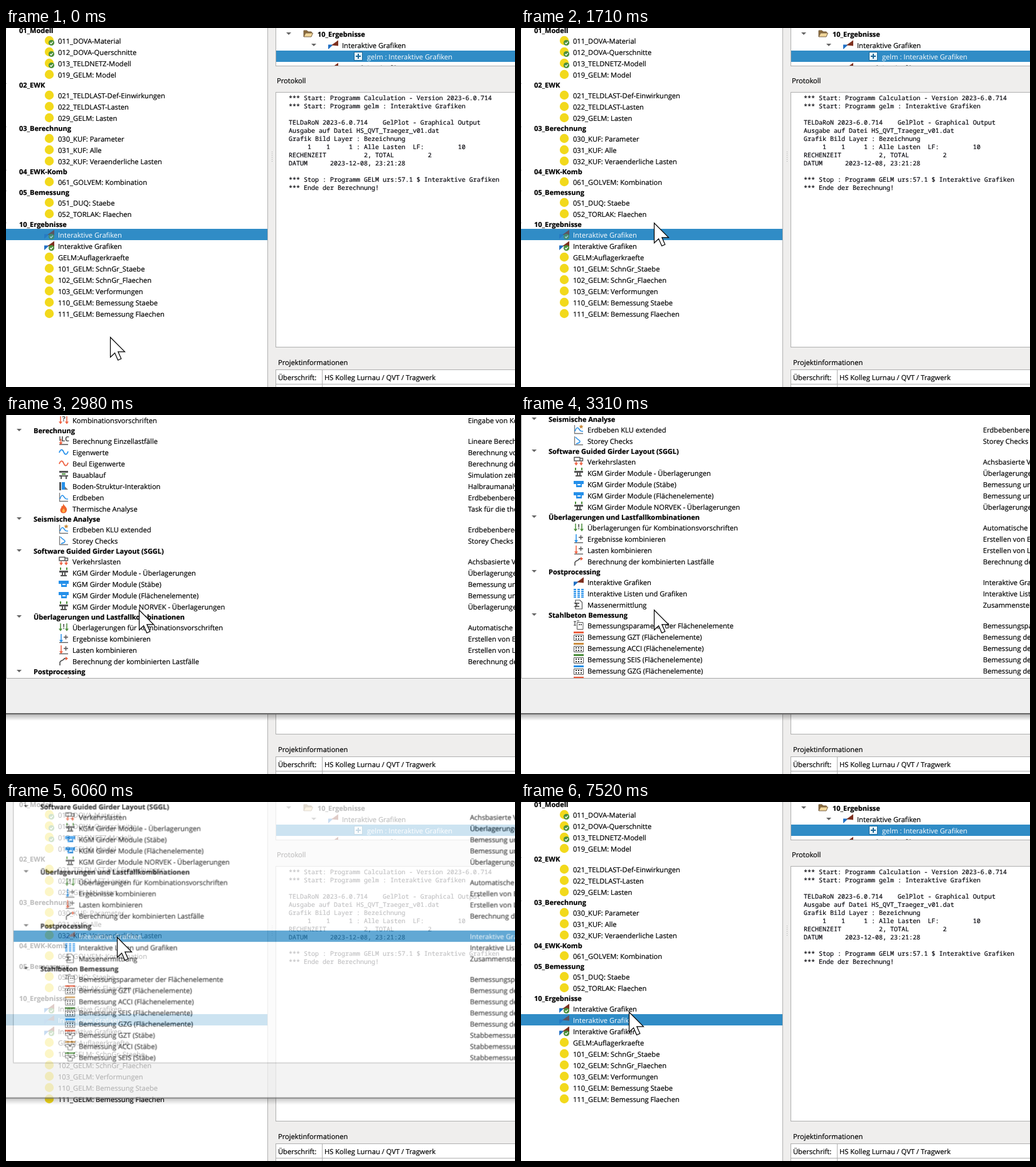
These frames come from a looping animation (812x572 px, 8 s). An HTML page:

```html
<!DOCTYPE html>
<html lang="de">
<head>
<meta charset="utf-8">
<title>Aufgabe einfügen</title>
<style>
  html, body { margin: 0; width: 100%; height: 100%; overflow: hidden; background: #fff; }
  svg { display: block; width: 812px; height: 572px; }
  text { font: 11.15px "Open Sans", "Noto Sans", sans-serif; fill: #000; stroke: #000; stroke-width: .2px; white-space: pre; text-rendering: geometricPrecision; }
  .head { font-weight: 700; font-size: 11px; }
  .log { font: 10px "Noto Sans Mono", "DejaVu Sans Mono", monospace; fill: #0a0a14; }
  .sel { fill: #fff; stroke: none; }
  #dialog { transform-origin: 1018px 73px; }
</style>
</head>
<body>
<svg viewBox="0 0 812 572">
  <defs>
    <clipPath id="listClip"><path d="M0-60H840V419H0Z"/></clipPath>
    <clipPath id="treeClip"><path d="M431 0H812V60H431Z"/></clipPath>
    <linearGradient id="shade" x2="0" y2="1">
      <stop stop-color="#000" stop-opacity=".28"/><stop offset="1" stop-color="#000" stop-opacity="0"/>
    </linearGradient>
  </defs>
  <g id="main"></g>
  <g id="before"></g>
  <g id="after"></g>
  <g id="rest"></g>
  <g id="dialog">
    <path d="M-40-60H840V477H-40Z" fill="#efefef"/>
    <path d="M0-60H840V419H0Z" fill="#fff"/>
    <g clip-path="url(#listClip)"><g id="list"></g></g>
    <path d="M.5-60V419.5H840" fill="none" stroke="#a8a8a8"/>
    <path d="M-40 476H840" stroke="#666" stroke-width="2"/>
    <path d="M-40 477H840V487H-40Z" fill="url(#shade)"/>
  </g>
  <g id="menu">
    <path d="M170 8H459V495H170Z" fill="#000" opacity=".12"/>
    <path d="M166.5 4.5H454.5V490.5H166.5Z" fill="#f2f2f2" stroke="#a0a0a0"/>
    <path id="hover" d="M168 0H453V22H168Z" fill="#90c8f6"/>
    <g id="entries"></g>
  </g>
  <circle id="ring" r="22.5" fill="none" stroke="#8a9aa8" stroke-width="2"/>
  <path id="cursor" d="M.5 .8V32.5L7.6 25.8 12.6 37.2 17.8 35 12.8 23.8H23.5Z" fill="#fff" stroke="#000" stroke-width="1.2"/>
</svg>
<script>
const LOOP = 8000;
const HILITE = '#308cc6', BLUE = '#2590ea', RED = '#ee6040', GRAY = '#555', GREEN = '#4b8f3b', AMBER = '#c98b3c', EDGE = '#b0b0b0';
const $ = id => document.getElementById(id);

const fill = (d, c) => `<path d="${d}" fill="${c}"/>`;
const line = (d, c, w = 1.5) => `<path d="${d}" fill="none" stroke="${c}" stroke-width="${w}"/>`;
const box = (x, y, w, h, c) => `<rect x="${x}" y="${y}" width="${w}" height="${h}" fill="${c}"/>`;
const txt = (x, y, s, cls = '') => `<text x="${x}" y="${y}" class="${cls}">${s}</text>`;
const at = (x, y, s, op = 1) => `<g transform="translate(${x} ${y})" opacity="${op}">${s}</g>`;
const chevron = (x, y) => fill(`M${x - 4} ${y - 2}h8l-4 4z`, '#666');

// 16 x 16 icons
const down = (x, c, y = 2) => line(`M${x} ${y}V12`, c) + fill(`M${x - 3} 10.5h6l-3 4z`, c);
const glyph = (x, y, s) => `<text x="${x}" y="${y}" style="font-weight:700;fill:${GRAY};stroke:none">${s}</text>`;
const axes = line('M1.5 1V14.5H15', '#777', 1.3);
const girder = fill('M1 5H15V8H11V12H13V14H3V12H5V8H1Z', GRAY) + fill('M7 8H9V12H7Z', '#fff');
const deck = fill('M0 3H16V8H13V13H4V8H0Z', BLUE) + fill('M6 8H11V10H6Z', '#fff');
const plate = c => box(0, 0, 16, 3, c) + line('M.5 5.5H15.5V14.5H.5Z', GRAY, 1) +
  [3, 7, 11].map(x => box(x, 7, 2, 2, '#333') + box(x, 11, 2, 2, '#333')).join('');
const beam = c => box(0, 0, 16, 3, c) + line('M.5 5.5H15.5V9.5H11.5V14.5H4.5V9.5H.5Z', GRAY, 1) + box(6, 7, 4, 2, '#333');
const wave = c => line('M1 9C3 3 6 3 8 8S13 13 15 7', c, 1.8);
const badge = `<circle cx="11.5" cy="11.5" r="4.6" fill="${GREEN}"/>` + line('M9.3 11.5L11 13.2 13.8 9.8', '#fff', 1.3);
const graph = fill('M0 7.5H8L0 15Z', '#1f6fc4') + fill('M5 8.500L16 .5V9.500Z', '#7d2f1e');
const icons = {
  dot: '<circle cx="8" cy="8" r="7.2" fill="#f2d91c"/>',
  cube: line('M2 4L8 1 14 4V8L8 14 2 8ZM2 4L8 7 14 4M8 7V14', GRAY, 1.2),
  blue: box(2, 2, 12, 12, '#2b9be8'), navy: box(2, 2, 12, 12, '#1c63b8'), black: box(1, 1, 14, 14, '#111'),
  ask: down(3, RED) + down(13, RED) + glyph(5.5, 10, '?'),
  lc: line('M2 1V8', GRAY) + line('M1 14H15', GRAY) + down(3.5, RED, 5) + glyph(4, 9, 'LC'),
  sine: wave(BLUE), buckle: wave(RED),
  stage: fill('M1 2H15V5H1ZM1 9H15V11H1ZM3 11H5V15H3ZM11 11H13V15H11Z', GRAY) + line('M5 7H11', GREEN, 2),
  soil: box(1, 2, 3, 13, GRAY) + fill('M5 2H10V14H5Z', BLUE) + fill('M10 9L15 14H10Z', '#777'),
  quake: axes + line('M2 11C5 2 7 5 9 8S12 11 15 11', BLUE),
  star: axes + line('M2 11C5 3 7 5 9 8S12 11 15 11', BLUE) + fill('M12 0L13 2.2 15.5 2.5 13.7 4.2 14.2 6.5 12 5.3 9.8 6.5 10.3 4.2 8.5 2.5 11 2.2Z', AMBER),
  flame: fill('M7 0C9 4 14 6 13 11C12 17 3 17 2.5 11C2.5 8 5 7 4.5 4C6.5 5 7.5 3 7 0Z', '#f0642c') + fill('M8 8C10 10 11 14 8 14S5 11 8 8Z', '#ffb648'),
  storey: axes + line('M3 2C5 6 13 8 9 11L4 13', BLUE),
  truck: line('M1 1.5H10V7H1ZM10 3H14.5V7H10', GRAY, 1.4) + down(4, RED, 8) + down(12, RED, 8),
  girder: girder + line('M3 0V4M13 0V4', GREEN, 2), deck,
  over: down(3, GREEN) + down(13, GREEN) + glyph(6.5, 11, '!'),
  sum: line('M1 14.5H15', GRAY, 1.3) + down(4, BLUE, 1) + line('M8 6H15M11.5 2.5V9.5', GRAY),
  load: line('M1 14.5H15', GRAY, 1.3) + down(4, RED, 1) + line('M8 6H15M11.5 2.5V9.5', GRAY),
  curve: line('M2 15V10C3 6 8 8 9 4H14', '#444') + fill('M11 1L15 4 11 7Z', RED),
  graph, done: graph + badge, checked: '<circle cx="8" cy="8" r="7.2" fill="#f2d91c"/>' + badge,
  table: [0, 6, 12].map(x => [2, 5, 8, 11, 14].map(y => box(x, y - 1, 4, 2, BLUE)).join('')).join(''),
  sigma: line('M3 5V1H10L13.5 4.5V15H3V12', GRAY, 1.2) + line('M9 6H2L5.5 8.5 2 11H9', '#333', 1.3),
  param: line('M5.5 3.5H15V14.5H5.5Z', GRAY, 1) + line('M2 2V8M0 2H4M0 8H4M5 1H9', '#333', 1) + box(8, 6, 2, 2, GRAY) + box(11, 6, 2, 2, GRAY),
  pr: plate(RED), pa: plate(AMBER), pg: plate(GREEN), pb: plate(BLUE),
  br: beam(RED), ba: beam(AMBER), bg: beam(GREEN)
};

// Rows are "icon|label|description"; a leading # marks a 15 px heading
function rows(lines, top, xHead, xIcon, xText, xOpen, sel) {
  let out = '';
  for (const row of lines.trim().split('\n')) {
    if (row[0] === '#') {
      out += chevron(xOpen, top + 7) + txt(xHead, top + 12, row.slice(1), 'head');
      top += 15;
    } else {
      const [icon, label, info] = row.split('|'), cls = sel ? 'sel' : '';
      if (sel) out += box(sel[0], top, sel[1], 18, HILITE);
      out += at(xIcon, top + 1, icons[icon], sel ? .6 : 1) + txt(xText, top + 14, label, cls);
      if (info) out += txt(737, top + 14, info, cls);
      top += 18;
    }
  }
  return out;
}
const tree = (lines, top, sel) => rows(lines, top, 21, 61, 83, -3, sel);
const tasks = (lines, top, sel) => rows(lines, top, 44, 84, 106, 21, sel);

const log = `*** Start: Programm Calculation - Version 2023-6.0.714
*** Start: Programm gelm : Interaktive Grafiken

TELDaRoN 2023-6.0.714    GelPlot - Graphical Output
Ausgabe auf Datei HS_QVT_Traeger_v01.dat
Grafik Bild Layer : Bezeichnung
     1    1     1 : Alle Lasten  LF:         10
RECHENZEIT          2, TOTAL         2
DATUM      2023-12-08, 23:21:28

*** Stop : Programm GELM urs:57.1 $ Interaktive Grafiken
*** Ende der Berechnung!`;

$('main').innerHTML =
  box(0, 0, 812, 572, '#fff') + box(417, 0, 395, 572, '#efeeed') + box(417, 0, 1, 572, EDGE) +
  [197, 200, 203, 206, 209, 212].map(y => box(424, y, 1, 1, '#aaa')).join('') +
  box(430, 0, 382, 61, EDGE) + box(431, 0, 381, 60, '#fff') + box(431, 36, 381, 18, HILITE) +
  '<g clip-path="url(#treeClip)">' + chevron(451, 9) + chevron(491, 27) +
  at(474, 1, fill('M1 3H6L8 5H14V7H4L2 13H1Z', '#8a6a3a') + fill('M4 7H16L13 13H1Z', '#f2d79a') + line('M1 13V3H6L8 5H13V7M4 7H15.5L13 13H1Z', '#7a6244', 1)) +
  txt(497, 14, '10_Ergebnisse', 'head') + at(514, 19, graph) + txt(536, 32, 'Interaktive Grafiken') +
  at(555, 38, box(0, 0, 14, 14, '#1d6796') + box(1, 1, 12, 12, '#e8f4fb') + line('M3 7H11M7 3V11', '#1d6796', 2)) +
  txt(576, 50, 'gelm : Interaktive Grafiken', 'sel') + at(514, 55, graph) + txt(536, 68, 'Interaktive Grafiken') + '</g>' +
  txt(432, 88, 'Protokoll') + box(430, 102, 382, 407, EDGE) + box(431, 103, 381, 405, '#fff') +
  log.split('\n').map((s, i) => txt(451, 115 + 13 * i, s, 'log')).join('') +
  txt(434, 537, 'Projektinformationen') + box(430, 544, 382, 28, EDGE) +
  box(431, 545, 73, 22, '#fff') + box(505, 545, 307, 22, '#fff') + box(431, 568, 73, 4, '#fff') + box(505, 568, 307, 4, '#fff') +
  txt(434, 561, 'Überschrift:') + txt(508, 561, 'HS Kolleg Lurnau / QVT / Tragwerk') +
  tree(`#01_Modell
checked|011_DOVA-Material
checked|012_DOVA-Querschnitte
checked|013_TELDNETZ-Modell
dot|019_GELM: Model
#02_EWK
dot|021_TELDLAST-Def-Einwirkungen
dot|022_TELDLAST-Lasten
dot|029_GELM: Lasten
#03_Berechnung
dot|030_KUF: Parameter
dot|031_KUF: Alle
dot|032_KUF: Veraenderliche Lasten
#04_EWK-Komb
dot|061_GOLVEM: Kombination
#05_Bemessung
dot|051_DUQ: Staebe
dot|052_TORLAK: Flaechen
#10_Ergebnisse`, -4);

$('before').innerHTML = tree('done|Interaktive Grafiken', 320, [0, 417]);
$('after').innerHTML = tree('done|Interaktive Grafiken', 320) + tree('graph|Interaktive Grafiken', 338, [0, 417]);
$('rest').innerHTML = tree(`done|Interaktive Grafiken
dot|GELM:Auflagerkraefte
dot|101_GELM: SchnGr_Staebe
dot|102_GELM: SchnGr_Flaechen
dot|103_GELM: Verformungen
dot|110_GELM: Bemessung Staebe
dot|111_GELM: Bemessung Flaechen`, 338);

$('list').innerHTML = tasks(`cube|VUK Export|Export von (Text)
blue|TELDKANT(-K) Systemeingabe|TELDKANT (-K):
navy|Tolva Systemeingabe|Tolva zur Generierung
black|Tundicarel Systemeingabe|Tunda zur Generierung
dot|Text Editor für Systemeingabe|Text Editor zur Eingabe
dot|Text Editor für Lasten|Text Editor für Lasten
ask|Kombinationsvorschriften|Eingabe von Kombinationen
#Berechnung
lc|Berechnung Einzellastfälle|Lineare Berechnung
sine|Eigenwerte|Berechnung von
buckle|Beul Eigenwerte|Berechnung der
stage|Bauablauf|Simulation zeitlich
soil|Boden-Struktur-Interaktion|Halbraumanalyse
quake|Erdbeben|Erdbebenberechnung
flame|Thermische Analyse|Task für die thermische
#Seismische Analyse
star|Erdbeben KLU extended|Erdbebenberechnung
storey|Storey Checks|Storey Checks
#Software Guided Girder Layout (SGGL)
truck|Verkehrslasten|Achsbasierte Verkehrslasten
girder|KGM Girder Module - Überlagerungen|Überlagerungen
deck|KGM Girder Module (Stäbe)|Bemessung und
deck|KGM Girder Module (Flächenelemente)|Bemessung und
girder|KGM Girder Module NORVEK - Überlagerungen|Überlagerungen
#Überlagerungen und Lastfallkombinationen
over|Überlagerungen für Kombinationsvorschriften|Automatische
sum|Ergebnisse kombinieren|Erstellen von Ergebnissen
load|Lasten kombinieren|Erstellen von Lasten
curve|Berechnung der kombinierten Lastfälle|Berechnung der
#Postprocessing
graph|Interaktive Grafiken|Interaktive Grafiken
table|Interaktive Listen und Grafiken|Interaktive Listen
sigma|Massenermittlung|Zusammenstellung
#Stahlbeton Bemessung
param|Bemessungsparameter der Flächenelemente|Bemessungsparameter
pr|Bemessung GZT (Flächenelemente)|Bemessung der
pa|Bemessung ACCI (Flächenelemente)|Bemessung der
pg|Bemessung SEIS (Flächenelemente)|Bemessung der
pb|Bemessung GZG (Flächenelemente)|Bemessung der
br|Bemessung GZT (Stäbe)|Stabbemessung
ba|Bemessung ACCI (Stäbe)|Stabbemessung
bg|Bemessung SEIS (Stäbe)|Stabbemessung`, -4) +
  `<g id="pick">${tasks('graph|Interaktive Grafiken|Interaktive Grafiken', 521, [1, 840])}</g>`;

let entryY = 9;
$('entries').innerHTML = 'Berechnen,Alles berechnen,Abbrechen,-,Bearbeiten,Text Editor,Eingabe prüfen,Ergebnisse,Protokoll,Ausgabe,-,Ausschneiden,Kopieren,Einfügen,Löschen,Task einfügen,Gruppe einfügen,Umbenennen,Aktivieren,Deaktivieren,Alle öffnen,Alle schließen,Eigenschaften'
  .split(',').map(s => {
    if (s === '-') { entryY += 6; return box(194, entryY - 3, 258, 1, '#d0d0d0'); }
    entryY += 22;
    return txt(198, entryY - 7, s);
  }).join('');

// Timelines: [ms, ...values]; held between rows unless another easing is given
function play(id, table, frame, easing = 'step-end') {
  const keys = table.map(([ms, ...v]) => ({ offset: ms / LOOP, easing, ...frame(...v) }));
  keys.push({ ...keys[keys.length - 1], offset: 1 });
  $(id).animate(keys, { duration: LOOP, iterations: Infinity });
}
const move = (x, y) => ({ transform: `translate(${x}px, ${y}px)` });
const slide = y => move(0, y);
const fade = opacity => ({ opacity });

play('cursor', [[0, 166, 492], [780, 166, 492], [980, 172, 450], [1180, 205, 320], [1260, 210, 298], [1380, 212, 310],
  [4070, 212, 310], [4260, 200, 235], [4400, 184, 180], [4600, 177, 215], [7000, 177, 215], [7200, 170, 300],
  [7320, 168, 346], [7450, 168, 346], [7520, 172, 334]], move, 'linear');
play('ring', [[0, 0, 166, 492], [70, .6, 166, 492], [400, 0, 166, 492], [4740, .6, 177, 215], [4930, 0, 177, 215]],
  (opacity, x, y) => ({ opacity, ...move(x, y) }));
play('menu', [[0, 0], [270, .4], [340, .8], [400, 1], [1650, .4], [1705, 0]], fade);
play('hover', [[0, -60], [920, 461], [970, 439], [1000, 417], [1034, 395], [1068, 373], [1102, 351], [1136, 329],
  [1170, 307], [1225, 285], [1350, 307]], slide);
play('dialog', [[0, 0, .95], [1840, .25, .965], [1910, .65, .985], [1980, .9, .996], [2050, 1, 1],
  [6055, .76, .989], [6130, .3, .968], [6200, 0, .95]],
  (opacity, s) => ({ opacity, transform: `scale(${s})` }));
play('list', [[0, 0], [2910, -54], [2980, -105], [3110, -159], [3180, -210], [3305, -264], [3380, -315]], slide);
play('pick', [[0, 0], [4740, 1]], fade);
play('before', [[0, 1], [6055, 0]], fade);
play('after', [[0, 0], [6055, 1]], fade);
play('rest', [[0, 0], [6055, 18]], slide);
</script>
</body>
</html>
```
